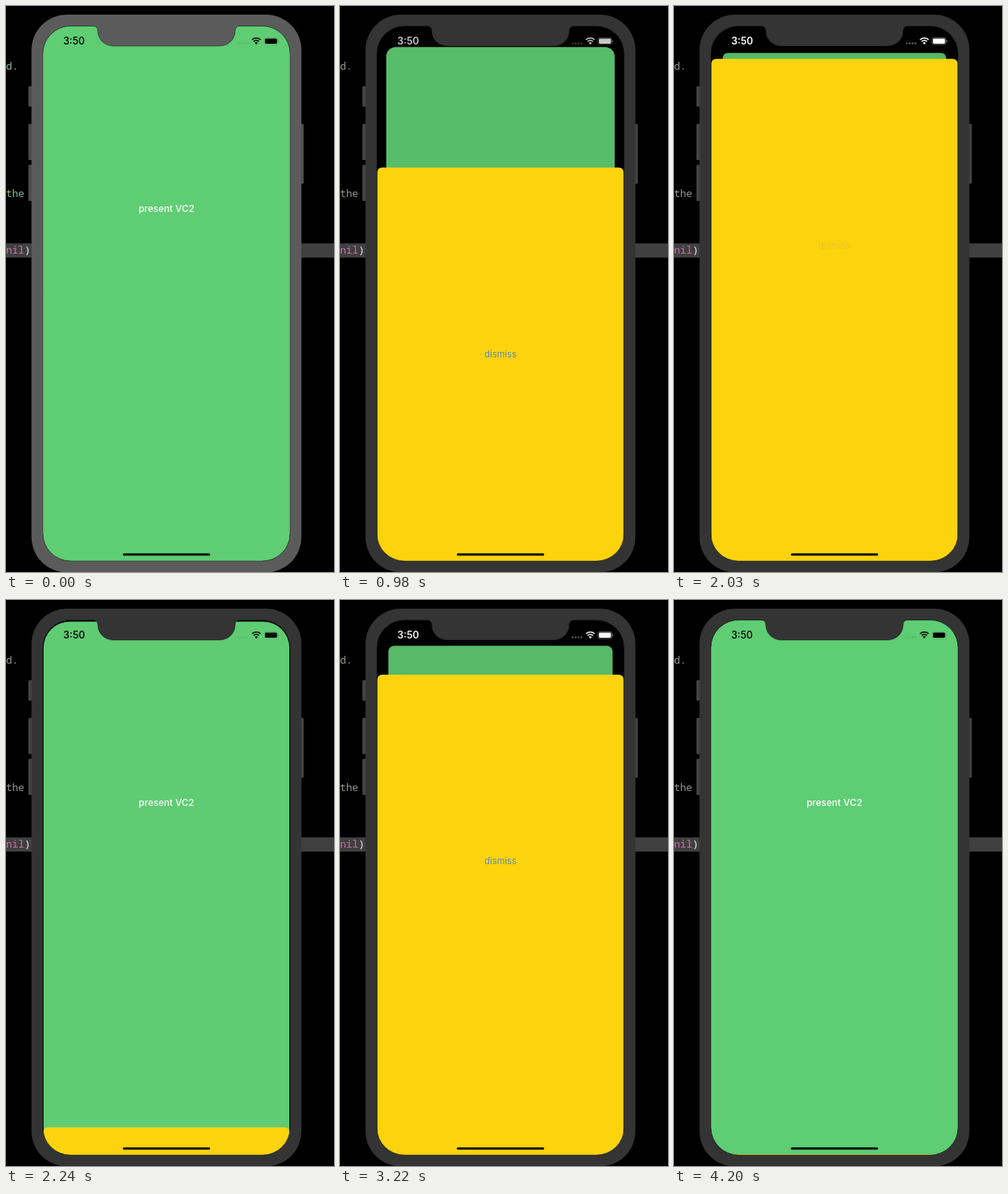
Recreate the animation shown at these times as an HTML page with a canvas. Size 418 px wide and 720 px high, loop 4.27 s.

```html
<!DOCTYPE html>
<html>
<head>
<meta charset="utf-8">
<style>
html, body { margin: 0; width: 418px; height: 720px; overflow: hidden; background: #000; }
canvas { display: block; }
</style>
</head>
<body>
<canvas id="stage" width="418" height="720"></canvas>
<script>
const c = document.getElementById('stage').getContext('2d');
const LOOP = 4270;
const SANS = 'Inter, "Liberation Sans", sans-serif';
const MONO = '"Noto Sans Mono", "DejaVu Sans Mono", monospace';

// Display outline with the notch cut out
const screen = new Path2D('M82 25.5H111Q117 25.5 117 32A20 19 0 0 0 137 51H272' +
  'A20 19 0 0 0 292 32Q292 25.5 298 25.5H327A35 35 0 0 1 362 60.5V671' +
  'A35 35 0 0 1 327 706H82A35 35 0 0 1 47 671V60.5A35 35 0 0 1 82 25.5Z');

// Sheet moves: start time, direction, stiffness
const moves = [[823, 1, 18.3], [2050, 0, 24], [2952, 1, 18.3], [3868, 0, 24]];
// Touches: down, up, lowest opacity
const presentTaps = [[750, 830, 0.2], [2870, 2950, 0]];
const dismissTaps = [[1950, 2050, 0.15], [3770, 3868, 0.15]];

const mix = (a, b, k) => a + (b - a) * k;
const clamp = v => Math.max(0, Math.min(1, v));

function sheetProgress(t) {
  const move = moves.filter(m => t >= m[0]).pop();
  if (!move) return 0;
  const x = move[2] * (t - move[0]) / 1000;
  const rest = (1 + x) * Math.exp(-x);
  return move[1] ? 1 - rest : rest;
}

function tapAlpha(t, taps) {
  return Math.min(...taps.map(([down, up, low]) =>
    1 - (1 - low) * Math.min(clamp((t - down) / 60), clamp(1 - (t - up) / 250))));
}

function box(x, y, w, h, r, fill) {
  c.fillStyle = fill;
  c.beginPath();
  c.roundRect(x, y, w, h, r);
  c.fill();
}

function text(str, x, y, font, fill, align = 'left') {
  c.font = font;
  c.fillStyle = fill;
  c.textAlign = align;
  c.fillText(str, x, y);
}

function drawEditor(t) {
  const green = t < 822 || (t >= 2520 && t < 2980);
  const comment = green ? (t < 70 ? '#8abf98' : '#70c585') : '#999';
  const mono = '500 13px ' + MONO;
  box(0, 302, 418, 18, 0, '#404040');
  text('d.', 0, 81, mono, comment);
  text('the', 0, 243, mono, comment);
  text('nil', 0, 315, mono, green && t >= 70 ? '#a6b596' : '#cf6aa6');
  text(')', 23.4, 315, mono, '#eee');
}

function drawPhone(bright) {
  const key = bright ? '#4c4c4c' : '#444';
  for (const [y, h] of [[102, 26], [150, 46], [202, 46]]) box(28.5, y, 8, h, 1.5, key);
  box(371, 150, 8.5, 76, 1.5, key);
  box(32.5, 11, 344, 709.5, 45, bright ? '#5b5b5b' : '#343434');
}

function drawStatus(p) {
  const v = Math.round(255 * p);
  const ink = a => `rgba(${v},${v},${v},${a})`;
  const weight = p < 0.02 ? 500 : 600;
  text('3:50', 73, 49.3, `${weight} 12.5px ${SANS}`, ink(1));
  for (let i = 0; i < 4; i++) box(295.3 + i * 3.7, 46.3, 2.6, 2.6, 1.3, ink(mix(0.08, 0.35, p)));
  c.strokeStyle = ink(1);
  c.lineWidth = 1.6;
  for (const r of [8, 5]) {
    c.beginPath();
    c.arc(319, 48.8, r, -Math.PI * 0.74, -Math.PI * 0.26);
    c.stroke();
  }
  c.fillStyle = ink(1);
  c.beginPath();
  c.moveTo(319, 49);
  c.arc(319, 49, 2.8, -Math.PI * 0.75, -Math.PI * 0.25);
  c.fill();
  c.strokeStyle = ink(mix(0.12, 0.45, p));
  c.lineWidth = 0.8;
  c.beginPath();
  c.roundRect(328.9, 40.4, 17.6, 8.6, 2.2);
  c.stroke();
  box(330, 41.5, 15.4, 6.4, 1.3, ink(1));
  box(347.2, 43.4, 1.2, 2.6, 0.6, ink(mix(0.12, 0.45, p)));
}

function drawMain(t, p) {
  const k = mix(1, 0.903, p);
  const radius = mix(35, 7, p);
  c.save();
  c.translate(204.5, 365.75 + 1.2 * p);
  c.scale(k, k);
  c.translate(-204.5, -365.75);
  box(47, 25.5, 315, 680.5, radius, '#5fcd73');
  c.globalAlpha = tapAlpha(t, presentTaps);
  text('present VC2', 204.5, 261.5, '500 12px ' + SANS, '#fff', 'center');
  c.globalAlpha = 1;
  box(47, 25.5, 315, 680.5, radius, `rgba(0,0,0,${0.1 * p})`);
  c.restore();
}

function drawSheet(t, p) {
  const y = 707.3 - 640 * p;
  box(47.5, y, 314, 660, [6, 6, 0, 0], '#fdd30d');
  c.globalAlpha = tapAlpha(t, dismissTaps);
  text('dismiss', 204.5, y + 241.5, '11.5px ' + SANS, '#5a8cb4', 'center');
  c.globalAlpha = 1;
}

function draw(now) {
  const t = now % LOOP;
  const p = sheetProgress(t);
  c.fillStyle = '#000';
  c.fillRect(0, 0, 418, 720);
  drawEditor(t);
  drawPhone(t < 70);
  c.save();
  c.clip(screen);
  c.fillStyle = '#000';
  c.fill(screen);
  drawMain(t, p);
  drawSheet(t, p);
  drawStatus(p);
  box(148.8, 696.2, 111.4, 3, 1.5, '#08160a');
  c.restore();
  c.strokeStyle = 'rgba(0,20,4,0.5)';
  c.lineWidth = 0.8;
  c.stroke(screen);
  requestAnimationFrame(draw);
}
requestAnimationFrame(draw);
</script>
</body>
</html>
```
